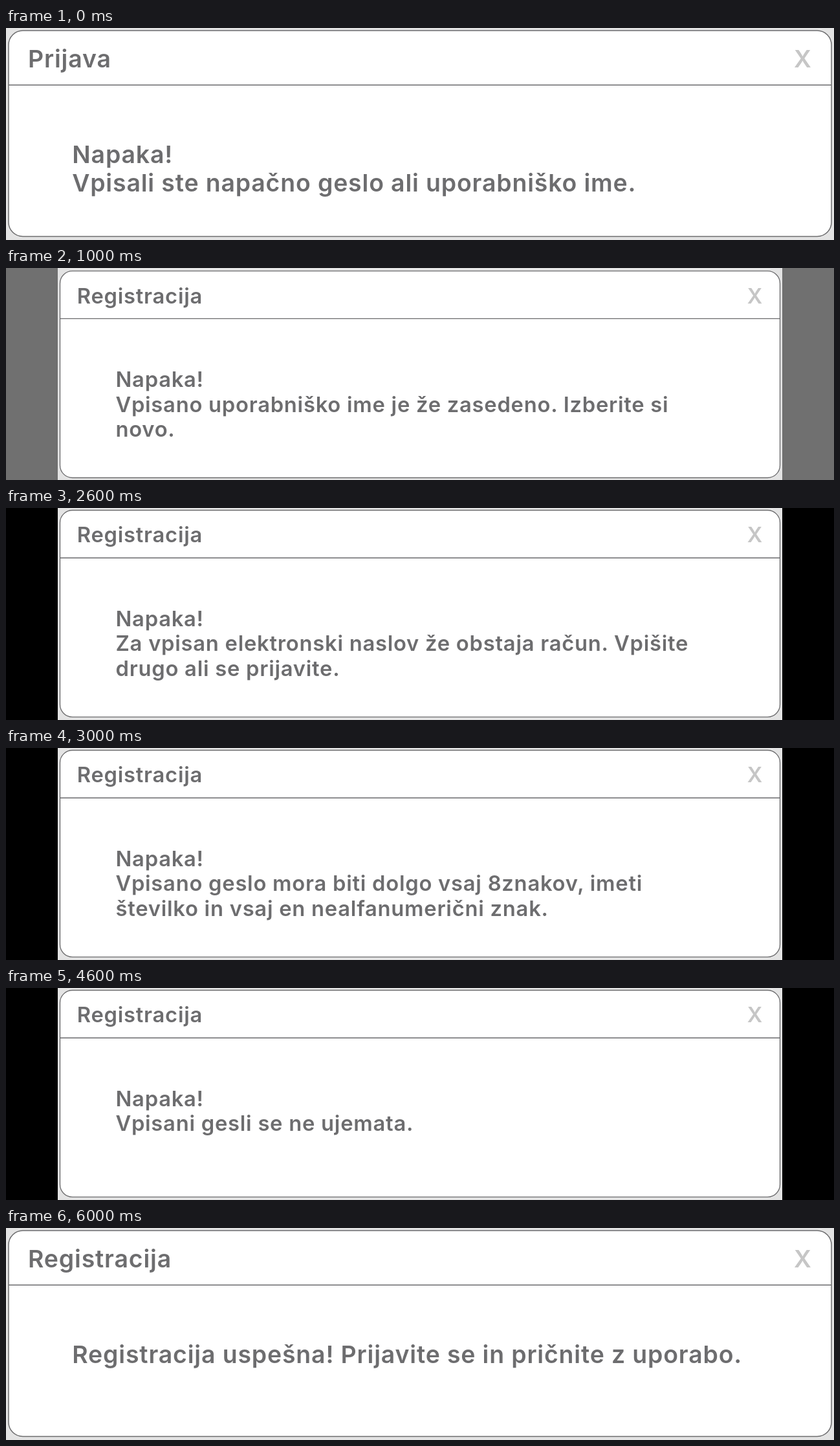
Write an HTML page that moves like this. It is 1280 px wide and 328 px high and loops after 7000 ms.

```html
<!DOCTYPE html>
<html lang="sl">
<head>
<meta charset="utf-8">
<style>
html, body { margin: 0; width: 100%; height: 100%; overflow: hidden; }
svg { display: block; }
text {
  font: 600 37.4px Inter, "Noto Sans", sans-serif;
  font-optical-sizing: none;
  letter-spacing: .023em;
  fill: #6d6d6f;
}
.close { fill: #c6c6c6; text-anchor: middle; }
.box { fill: #fff; }
.box, .rule { stroke: #6b6b6d; stroke-width: 1.5; }
</style>
</head>
<body>
<svg id="stage" width="1280" height="328" viewBox="0 0 1280 328"></svg>
<script>
const stage = document.getElementById("stage");

// Placement of the dialog: side colour, panel edges, offset, scale, bottom edge
const wide = { side: "#e3e3e3", left: 0, right: 1280, x: 0, y: 0, k: 1, bottom: 322.5 };
const black = { side: "#000", left: 80, right: 1200, x: 80, y: 0, k: .875, bottom: 323.3 };
const grey = { ...black, side: "#707070", y: 1.2, bottom: 324.5 };
const narrow = { ...black, left: 85, right: 1195, x: 83.3, y: 1.3, k: .868, bottom: 322 };

const slides = [
  [wide, "Prijava", "Napaka!", "Vpisali ste napačno geslo ali uporabniško ime."],
  [grey, "Registracija", "Napaka!", "Vpisano uporabniško ime je že zasedeno. Izberite si", "novo."],
  [black, "Registracija", "Napaka!", "Za vpisan elektronski naslov že obstaja račun. Vpišite", "drugo ali se prijavite."],
  [black, "Registracija", "Napaka!", "Vpisano geslo mora biti dolgo vsaj 8znakov, imeti", "številko in vsaj en nealfanumerični znak."],
  [black, "Registracija", "Napaka!", "Vpisani gesli se ne ujemata."],
  [narrow, "Registracija", "Napaka!", "Ime in priimek je lahko sestavljeno samo iz", "alfanumeričnih znakov."],
  [wide, "Registracija", "Registracija uspešna! Prijavite se in pričnite z uporabo."]
];

const label = (x, y, s, cls = "") => `<text x="${x}" y="${y}" class="${cls}">${s}</text>`;

function render([p, title, ...lines]) {
  const height = (p.bottom - p.y) / p.k - 4;
  stage.innerHTML = `
    <rect width="1280" height="328" fill="${p.side}"/>
    <rect x="${p.left}" width="${p.right - p.left}" height="328" fill="#e3e3e3"/>
    <g transform="translate(${p.x} ${p.y}) scale(${p.k})">
      <rect class="box" x="4" y="4" width="1272" height="${height}" rx="22"/>
      <path class="rule" d="M4 88.3H1276"/>
      ${label(34, 61, title)}
      ${label(1232, 61, "X", "close")}
      ${lines.map((s, i) => label(102.3, 209 + 44 * i, s)).join("")}
    </g>`;
}

const start = performance.now();
let shown = -1;
function tick() {
  const i = Math.floor((performance.now() - start) / 1000) % slides.length;
  if (i !== shown) render(slides[shown = i]);
  requestAnimationFrame(tick);
}
tick();
</script>
</body>
</html>
```
